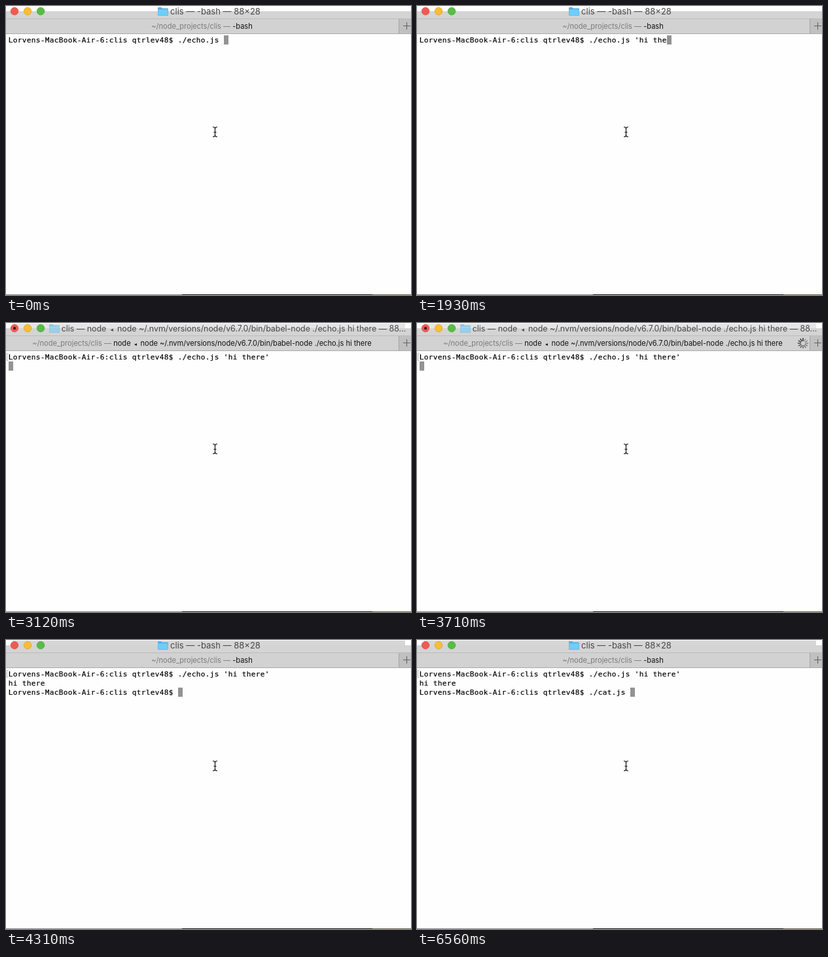
Animation of 619x443 px, one loop 8 s. Source, as an HTML page:

```html
<!DOCTYPE html>
<html lang="en">
<head>
<meta charset="utf-8">
<title>Terminal session</title>
<style>
  html, body { margin: 0; width: 100%; height: 100%; overflow: hidden; background: #fefefe; }
  svg { display: block; width: 619px; height: 443px; }
  text { white-space: pre; font-family: Inter, "DejaVu Sans", sans-serif; }
  .centered { text-anchor: middle; }
  #title { fill: #474747; }
  #tab { font-size: 11.05px; fill: #111; }
  #path { fill: #7b7b7b; }
  .arrow { font-size: 70%; }
  /* one glyph per 7px terminal cell */
  #lines text {
    font: 11px "DejaVu Sans Mono", monospace; letter-spacing: calc(7px - 1ch);
    fill: #000; stroke: #000; stroke-width: .2px;
  }
</style>
</head>
<body>
<svg viewBox="0 0 619 443">
  <rect width="619" height="443" fill="#fefefe"/>

  <!-- title bar -->
  <rect y="8" width="619" height="12" fill="#d4d4d4"/>
  <rect id="strip" x="11" y="1" width="599" height="7"/>
  <g stroke-width=".7">
    <circle cx="13" cy="8" r="5.8" fill="#ee5b54" stroke="#d54b45"/>
    <circle cx="33" cy="8" r="5.8" fill="#f8bd36" stroke="#dca02d"/>
    <circle cx="53" cy="8" r="5.8" fill="#56bd45" stroke="#46a637"/>
  </g>
  <circle id="busyDot" cx="13" cy="8" r="2.2" fill="#48100e"/>
  <g id="folder">
    <path d="M0 3.2q0-1.2 1.2-1.2h4l1.6 1.6h8q1.2 0 1.2 1.2v9q0 1.2-1.2 1.2H1.2Q0 15 0 13.8z" fill="#55b0e2"/>
    <path d="M.5 5.2h15v8.3q0 1-1 1h-13q-1 0-1-1z" fill="#73cbf7"/>
  </g>
  <text id="title" class="centered" y="13"></text>

  <!-- tab bar -->
  <rect y="19" width="619" height="24" fill="#d2d2d2"/>
  <rect y="19" width="619" height="1" fill="#bcbcbc"/>
  <rect x="600" y="20" width="19" height="22" fill="#c0c0c0"/>
  <rect x="600" y="20" width="1" height="22" fill="#a5a5a5"/>
  <rect y="42" width="619" height="1" fill="#a9a9a9"/>
  <path d="M607 30.5h11M612.5 25v11" stroke="#626262" stroke-width="1.1"/>
  <text id="tab" class="centered" x="299.5" y="35"><tspan id="path">~/node_projects/clis — </tspan><tspan id="process"></tspan></text>
  <g id="spinner" stroke-width="1.5" stroke-linecap="round"></g>

  <!-- terminal -->
  <path id="mark" d="M3.5 46.5h-2v11h2" fill="none" stroke="#b9b9b9"/>
  <rect id="cursor" width="7" height="14" fill="#939393"/>
  <g id="lines"></g>

  <!-- pointer -->
  <path d="M316.5 185.5q3 0 3 2.5v10q0 2.5-3 2.5M322.5 185.5q-3 0-3 2.5M322.5 200.5q-3 0-3-2.5M318 193.5h3"
    fill="none" stroke="#111" stroke-width="1.2" stroke-linecap="round"/>

  <!-- bottom edge -->
  <rect y="442" width="269" height="1" fill="#858585"/>
  <rect x="269" y="442" width="291" height="1" fill="#111"/>
  <rect x="560" y="442" width="59" height="1" fill="#6b6146"/>
</svg>
<script>
const LOOP = 8000;
const CELL = 7, ROW = 14, LEFT = 4, TOP = 45;
const ENTER = 2970, BUSY = 3120, SPIN = 3410, OUTPUT = 4160, IDLE = 4310;
const PROMPT = "Lorvens-MacBook-Air-6:clis qtrlev48$ ";
const COMMAND = 'node\u2002<tspan class="arrow">◂</tspan>\u2002node ' +
  "~/.nvm/versions/node/v6.7.0/bin/babel-node ./echo.js hi there";

// [time, characters added]
const FIRST = [[0, "./echo.js "], [450, "'"], [1040, "h"], [1190, "i"], [1340, " "],
  [1640, "t"], [1790, "h"], [1930, "e"], [2080, "re"], [2530, "'"]];
const SECOND = [[5510, "."], [5660, "/"], [5810, "c"], [6410, "a"], [6560, "t.js "]];

const $ = id => document.getElementById(id);
const add = (parent, tag, attrs) => {
  const node = document.createElementNS("http://www.w3.org/2000/svg", tag);
  for (const key in attrs) node.setAttribute(key, attrs[key]);
  return parent.appendChild(node);
};
const show = (node, on) => node.setAttribute("visibility", on ? "visible" : "hidden");
const typed = (keys, t) => keys.filter(([at]) => t >= at).map(([, chars]) => chars).join("");

const rows = [0, 1, 2].map(i => add($("lines"), "text", { x: LEFT - 0.2, y: TOP + 11 + i * ROW }));
const spokes = Array.from({ length: 12 }, (_, i) =>
  add($("spinner"), "path", { d: "M590 27.2v-3.8", transform: `rotate(${i * 30} 590 31)` }));

function drawWindow(t) {
  const busy = t >= BUSY && t < IDLE;
  $("strip").setAttribute("fill", t < BUSY ? "#fefefe" : busy ? "#e5e5e5" : "#d6d6d6");
  show($("busyDot"), busy);
  $("folder").setAttribute("transform", `translate(${busy ? 66 : 232} 0)`);
  $("folder").setAttribute("opacity", busy ? 0.6 : 1);
  $("title").setAttribute("x", busy ? 348 : 320);
  $("title").setAttribute("font-size", busy ? 12.4 : 13);
  $("title").innerHTML = `clis — ${busy ? COMMAND + " — 88…" : "-bash — 88×28"}`;
  $("process").innerHTML = busy ? COMMAND : "-bash";

  show($("spinner"), t >= SPIN && t < IDLE);
  const head = 2 * Math.floor((t - SPIN) / 150) + 8;
  spokes.forEach((spoke, i) => {
    const age = (((head - i) % 12) + 12) % 12;
    const gray = 40 + age * 10;
    spoke.setAttribute("stroke", `rgb(${gray},${gray},${gray})`);
  });
}

function drawTerminal(t) {
  const lines = [PROMPT + typed(FIRST, t)];
  if (t >= OUTPUT) lines.push("hi there", PROMPT + typed(SECOND, t));
  else if (t >= ENTER) lines.push("");
  rows.forEach((row, i) => row.textContent = lines[i] || "");
  show($("mark"), t >= ENTER);
  const last = lines.length - 1;
  $("cursor").setAttribute("x", LEFT + lines[last].length * CELL);
  $("cursor").setAttribute("y", TOP + last * ROW);
}

const start = performance.now();
function frame() {
  const t = (performance.now() - start) % LOOP;
  drawWindow(t);
  drawTerminal(t);
  requestAnimationFrame(frame);
}
frame();
</script>
</body>
</html>
```
